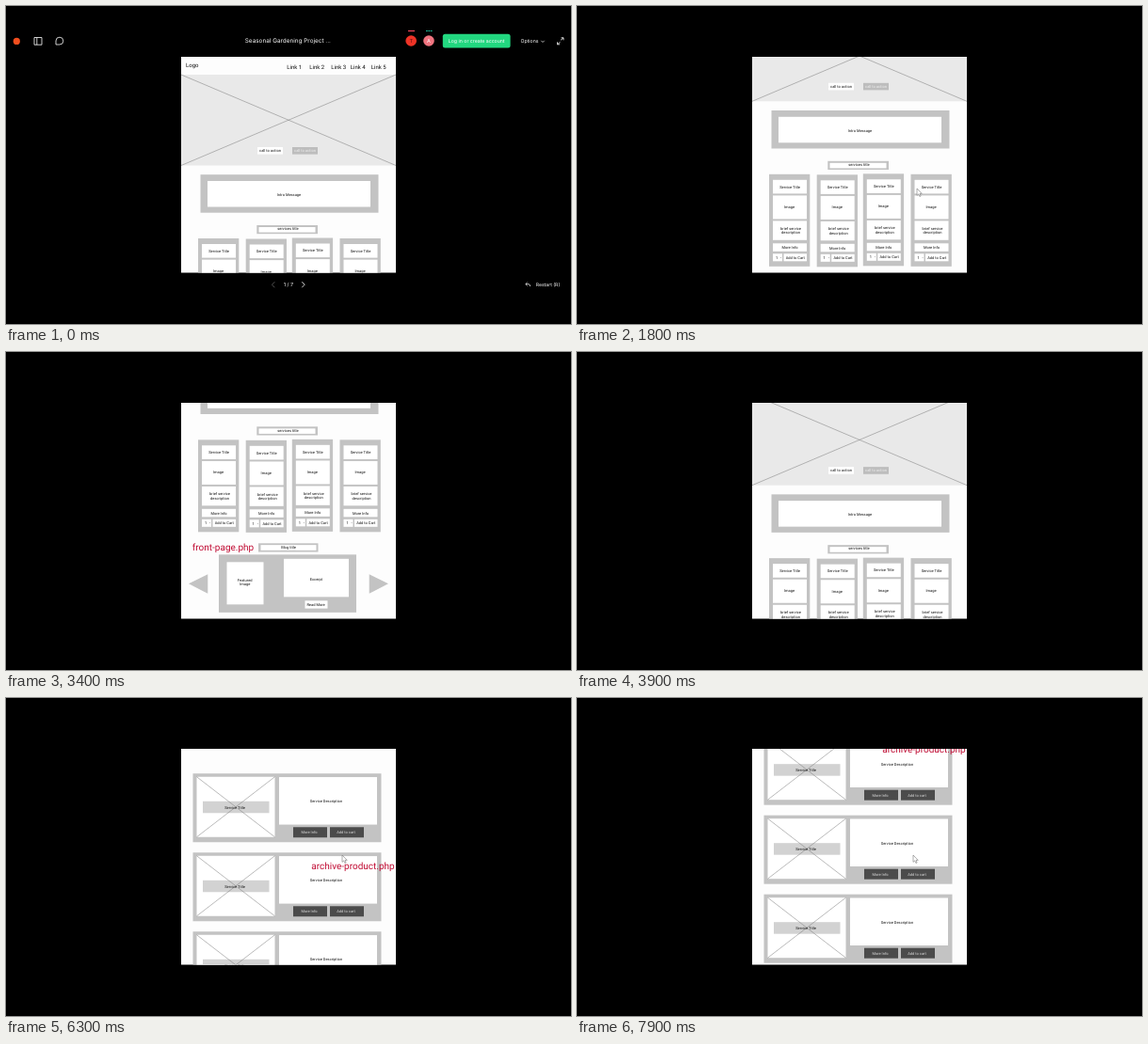
Recreate the animation shown at these times as an HTML page. Size 600 by 338 pixels, loop 8000 ms.

```html
<!DOCTYPE html>
<html lang="en">
<head>
<meta charset="utf-8">
<title>Wireframe walkthrough</title>
<style>
  html, body { margin: 0; height: 100%; overflow: hidden; background: #000; }
  svg { display: block; }
  text { font-family: Roboto, sans-serif; text-rendering: geometricPrecision; }
  #bar text { font-family: Inter, sans-serif; }
</style>
</head>
<body>
<svg id="stage" width="600" height="338" viewBox="0 0 600 338"></svg>
<script>
const GREY = '#c3c3c3', WHITE = '#fff', RED = '#c00a32';
const HOME_FOOTER = 309, SHOP_END = 220;

// Boxes are given by their edges, text by the middle of its line.
const box = (l, t, r, b, fill = WHITE, rx = 0) =>
  `<rect x="${l}" y="${t}" width="${r - l}" height="${b - t}" rx="${rx}" fill="${fill}"/>`;
const text = (s, x, y, size = 4, fill = '#111', anchor = 'middle') =>
  `<text x="${x}" y="${y + size * 0.355}" font-size="${size}" fill="${fill}" text-anchor="${anchor}">${s}</text>`;
const lines = (rows, x, y, step = 4.6) => rows.map((s, i) => text(s, x, y + i * step)).join('');
const line = (d, stroke = '#fff', width = 0.8, extra = '') =>
  `<path d="${d}" fill="none" stroke="${stroke}" stroke-width="${width}" ${extra}/>`;
const cross = (l, t, r, b) => line(`M${l} ${t}L${r} ${b}M${r} ${t}L${l} ${b}`, '#777', 0.5);
const shift = (x, y, content) => `<g transform="translate(${x} ${y})">${content}</g>`;
const label = (s, x, y) => text(s, x, y, 10, RED, 'start');

const header = text('Logo', 191, 63, 6, '#111', 'start') +
  [298.3, 322.3, 345.3, 365.8, 387.8].map((x, i) => text(`Link ${i + 1}`, x, 64.4, 6, '#111', 'start')).join('');

const footer = box(186, 231, 414, 300, GREY) +
  box(199, 235, 238, 271) + lines(['contact', 'information', '/', 'address'], 219, 246.8, 4.8) +
  box(270.5, 235, 333.5, 270) + text('map', 300.5, 255) + label('footer.php', 282, 241.2) +
  box(363.5, 235, 402.5, 269.5) + lines(['site', 'map'], 383, 252) +
  box(270.5, 275, 333.5, 281);

const serviceCard = box(204, 247, 247.3, 345, GREY) +
  box(208, 253, 244, 267.6) + text('Service Title', 226, 260.3) +
  box(208, 269.6, 244, 294.6) + text('Image', 225.5, 281.7) +
  box(208, 296.6, 244, 317) + lines(['brief service', 'description'], 227, 304.4) +
  box(208, 320.5, 244, 329) + text('More Info', 226, 325) +
  box(208, 331.5, 218, 339.5) + text('1', 212, 335.5) + text('-', 216.5, 335.5) +
  box(219.5, 331.5, 244, 339.5) + text('Add to Cart', 231.8, 335.5);

const titleBar = (s, y) => box(268, y, 331.5, y + 9.2, GREY) + box(270.5, y + 1.8, 329.5, y + 7.5) + text(s, 300, y + 4.3);

const blog = titleBar('Blog title', 357) + label('front-page.php', 197.8, 361) +
  box(226, 369, 372, 430.5, GREY) +
  box(234.5, 377, 273.5, 422) + lines(['Featured', 'Image'], 253.7, 396) +
  box(295, 373.5, 364, 414) + text('Excerpt', 329.5, 395) +
  box(317.5, 418, 341.5, 426.3) + text('Read More', 329, 422) +
  `<path d="M194 400L214.3 390V410.5ZM406 400L385.7 390V410.5Z" fill="${GREY}"/>`;

const home = header +
  box(186, 73, 414, 169.5, '#e9e9e9') + cross(186, 73, 414, 169.5) +
  box(267, 150, 294, 157.6) + text('call to action', 280.5, 153.8) +
  box(304, 150, 331, 157.6, '#bdbdbd') + text('call to action', 317.5, 153.8, 4, '#eee') +
  box(206.5, 179.2, 395.5, 219.7, GREY) + box(214, 186, 387, 213.5) + text('Intro Message', 300.5, 200.5) +
  box(266.3, 233, 331, 242.2, GREY) + box(268.5, 235, 328.5, 240.6) + text('services title', 299.5, 236.8) +
  [[0, 0], [50.7, 0.5], [99.8, -0.5], [150.5, 0]].map(([x, y]) => shift(x, y, serviceCard)).join('') +
  blog +
  box(219.5, 445, 378, 468.5, GREY) + box(226.5, 449.5, 371, 463.7) + lines(['Testimonial', 'slider?'], 300.5, 454.2) +
  titleBar('Velimoora', 481.7) +
  shift(0, HOME_FOOTER, footer);

const button = (s, l) => box(l, 192, l + 36, 203, '#4b4b4b') + text(s, l + 17, 197.7, 4, '#ddd');
const productCard = box(198.5, 135, 398.5, 208, GREY) +
  box(202.5, 138.5, 285.5, 202.5) + box(209, 164.5, 279.5, 177, '#d2d2d2') +
  cross(202.5, 138.5, 285.5, 202.5) + text('Service Title', 243, 171) +
  box(290, 138.8, 394, 189.3) + text('Service Description', 340, 164.7) +
  button('More Info', 305) + button('Add to cart', 344);

const shop = header +
  [0, 1, 2, 3].map(i => shift(0, SHOP_END - 84 * i, productCard)).join('') +
  label('archive-product.php', 324.3, 201) + shift(0, SHOP_END, footer);

const bar = '<circle cx="11.3" cy="37.4" r="3.6" fill="#f24e1e"/>' +
  line('M30 33.5H38V41.2H30ZM32.8 33.5V41.2') +
  line('M53 41V37A3.9 3.9 0 1 1 56.9 41Z') +
  text('Seasonal Gardening Project ...', 299.3, 37.2, 6.4, '#fff') +
  line('M427 26.5H434', '#f0455a', 1.2) + line('M446 26.5H453', '#1fc3a0', 1.2, 'stroke-dasharray="1.8 .6"') +
  '<circle cx="430.2" cy="37" r="5.8" fill="#ee3326"/><circle cx="449" cy="37" r="5.8" fill="#f0747f"/>' +
  text('T', 430.2, 37, 5.5, '#5c1010') + text('A', 449, 37, 5.5, '#fff') +
  box(463.8, 29.8, 535.6, 44.6, '#22d880', 2.5) +
  text('Log in or create account', 499.7, 37.2, 5.2, '#fff') +
  text('Options', 556, 37.2, 5.2, '#fff') + line('M568.3 36.8L570 38.5L571.7 36.8', '#fff', 0.7) +
  line('M589 36.3L592 33.8M589.5 33.8H592V36.3M588.5 38.3L585.5 40.8M585.5 38.3V40.8H588', '#fff', 0.8) +
  line('M285.3 293.2L282.5 296.2L285.3 299.2', '#666') + text('1 / 7', 300, 296.2, 5.5, '#fff') +
  line('M314.3 293.2L317.1 296.2L314.3 299.2') +
  line('M553.7 293.8L551.8 295.6L553.7 297.4M551.8 295.6H555Q556.6 295.6 556.6 298', '#fff', 0.7) +
  text('Restart (R)', 575.5, 296.2, 5.1, '#fff');

const outline = 'fill="#fff" stroke="#777" stroke-width=".6" stroke-linejoin="round"';
stage.innerHTML = `<svg x="186" y="54" width="228" height="229.5" viewBox="186 54 228 229.5">
    ${box(186, 54, 414, 284, '#fdfdfd')}<g id="home">${home}</g><g id="shop">${shop}</g>
  </svg>
  <g id="bar">${bar}</g>
  <g id="pointer">
    <path id="arrow" d="M0 0V7.4L1.7 5.9L2.9 8.5L4.1 8L3 5.4H5.2Z" ${outline}/>
    <path id="hand" d="M-.7 .8Q0 -.5 .7 .8V4L3.6 4.7Q4.3 5 4.1 6.2L3.4 9.3H-.2L-2 6.3Q-1.6 5.2 -.7 6Z" ${outline}/>
  </g>`;

const homeScroll = [[1300, 0], [1400, 3], [1600, 28], [1900, 88], [2400, 212], [2700, 292], [2800, HOME_FOOTER],
  [2900, 300], [3100, 250], [3600, 90], [3900, 28], [4050, 6], [4150, 0]];
const shopScroll = [[6200, 0], [6400, 45], [6750, 190], [6950, SHOP_END], [7430, SHOP_END], [7500, 214],
  [7700, 184], [7900, 146.5], [8000, 128]];
const pointerX = [[100, 530], [900, 361], [4900, 361], [4901, 350], [5300, 333], [5600, 333], [6100, 357]];
const pointerY = [[100, 38], [900, 204], [1300, 194], [4900, 194], [4901, 114], [5300, 66], [5600, 66], [6100, 167]];

const linear = p => p;
const smooth = p => p * p * (3 - 2 * p);
function valueAt(keys, t, ease = linear) {
  const next = keys.findIndex(k => k[0] > t);
  if (next < 0) return keys[keys.length - 1][1];
  if (!next) return keys[0][1];
  const [t0, a] = keys[next - 1], [t1, b] = keys[next];
  return a + (b - a) * ease((t - t0) / (t1 - t0));
}

const el = id => document.getElementById(id);
const show = (id, on) => el(id).setAttribute('visibility', on ? 'visible' : 'hidden');
const move = (id, x, y) => el(id).setAttribute('transform', `translate(${x} ${y})`);

const start = performance.now();
function draw(now) {
  const t = Math.max(0, now - start) % 8000;
  const onShop = t >= 5600, pointing = t >= 5250 && !onShop;
  show('home', !onShop);
  show('shop', onShop);
  move('home', 0, -valueAt(homeScroll, t));
  move('shop', 0, -valueAt(shopScroll, t));
  el('bar').setAttribute('opacity', valueAt([[1000, 1], [1200, 0]], t));
  const visible = (t >= 100 && t < 2900) || t >= 4900;
  show('arrow', visible && !pointing);
  show('hand', visible && pointing);
  move('pointer', valueAt(pointerX, t, smooth), valueAt(pointerY, t, smooth));
  requestAnimationFrame(draw);
}
draw(start);
</script>
</body>
</html>
```
